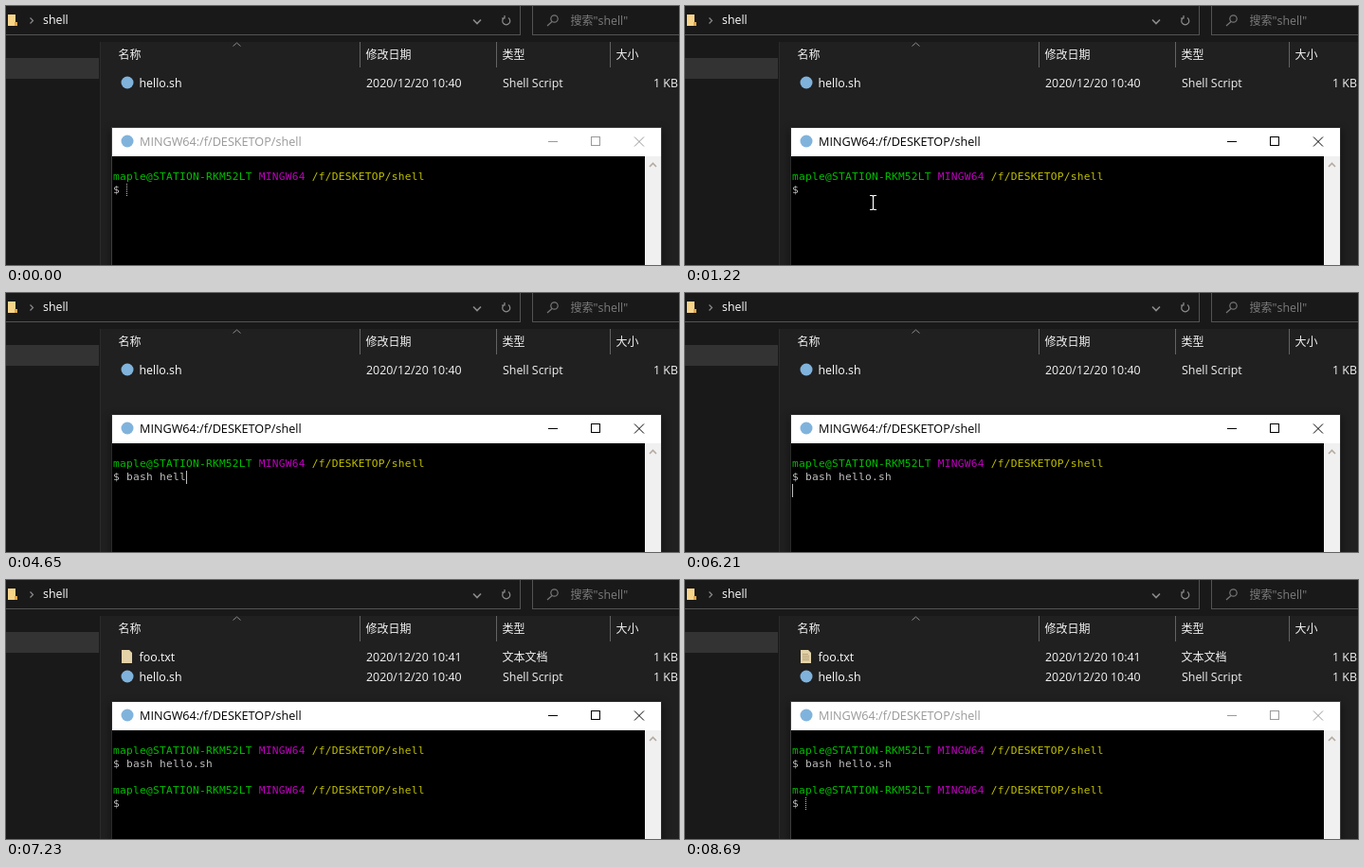
Write an HTML page that moves like this. It is 710 px wide and 274 px high and loops after 8770 ms.

```html
<!DOCTYPE html>
<html lang="zh-CN">
<head>
<meta charset="utf-8">
<title>shell</title>
<style>
html, body { margin: 0; width: 100%; height: 100%; overflow: hidden; background: #202020; }
svg { display: block; width: 710px; height: 274px; }
text { white-space: pre; }
.ui { font: 12.4px "Open Sans", "Noto Sans CJK SC", "Noto Sans CJK", sans-serif; fill: #fff; }
.cjk { font: 12px "Noto Sans CJK SC", "Noto Sans CJK", sans-serif; fill: #f2f2f2; }
.info { fill: #f2f2f2; }
.term { font: 11.2px "DejaVu Sans Mono", monospace; letter-spacing: .257px; fill: #bfbfbf; }
.line { fill: none; stroke: #8c8c8c; stroke-width: 1.2; }
.crisp { shape-rendering: crispEdges; }
#shadow { filter: blur(5px); opacity: .4; }
</style>
</head>
<body>
<svg viewBox="0 0 710 274">
  <rect width="710" height="274" fill="#202020"/>
  <rect width="710" height="38" fill="#191919"/>
  <rect y="38" width="100" height="236" fill="#191919"/>
  <g class="crisp">
    <rect y="55" width="98" height="22" fill="#333"/>
    <rect x="99" y="38" width="1" height="236" fill="#2b2b2b"/>
    <path d="M0 30.5H542.5V0M555.5 0V30.5H710" fill="none" stroke="#535353"/>
    <path d="M373.5 38V65M517.5 38V65M637.5 38V65" stroke="#636363"/>
  </g>

  <path d="M2 9h8v8h2v4H2z" fill="#f7d48a"/>
  <path d="M9 17h3v4H9z" fill="#e0a94e"/>
  <path class="line" d="M25.500 12.500l3 3-3 3"/>
  <text class="ui" x="39" y="19">shell</text>
  <path class="line" d="M493 14.500l4 4 4-4" style="stroke-width:1.600"/>
  <path class="line" d="M530 12.500a4 4 0 1 1-4.500 0M526 10v3h-3"/>
  <g class="line" style="stroke:#777"><circle cx="578.500" cy="13.500" r="3.700"/><path d="M576 16.500L571 21"/></g>
  <text class="ui" x="595.500" y="20" style="fill:#7c7c7c"><tspan font-size="12">搜索</tspan>"shell"</text>

  <path class="line" d="M239.500 42.500l4-3.500 4 3.500" style="stroke-width:1"/>
  <text class="cjk" x="118.500" y="56">名称</text>
  <text class="cjk" x="379.500" y="56">修改日期</text>
  <text class="cjk" x="523.500" y="56">类型</text>
  <text class="cjk" x="643.500" y="56">大小</text>

  <g id="foo">
    <path d="M122 74h8l3 3v11h-11z" fill="#e3d2a8"/>
    <path id="rules" d="M124 78.500h6M124 80.500h7M124 82.500h7M124 84.500h7" stroke="#b5a179" fill="none"/>
    <text class="ui" x="140.500" y="86">foo.txt</text>
    <text class="ui info" x="380" y="86">2020/12/20 10:41</text>
    <text class="cjk" x="523.500" y="86">文本文档</text>
    <text class="ui info" x="683" y="86">1 KB</text>
  </g>
  <g id="hello">
    <circle cx="128" cy="81" r="6.500" fill="#80b3dc"/>
    <text class="ui" x="140.500" y="86">hello.sh</text>
    <text class="ui info" x="380" y="86">2020/12/20 10:40</text>
    <text class="ui info" x="524" y="86">Shell Script</text>
    <text class="ui info" x="683" y="86">1 KB</text>
  </g>

  <rect id="shadow" x="110" y="131" width="583" height="160"/>
  <rect id="frame" x="111" y="128" width="581" height="147"/>
  <rect x="112" y="129" width="579" height="145" fill="#000"/>
  <rect x="112" y="129" width="579" height="30" fill="#fff"/>
  <rect x="674" y="159" width="17" height="115" fill="#f0f0f0"/>
  <path d="M679 170l3.500-3.500 3.500 3.500" fill="none" stroke="#b5aaa0" stroke-width="1.600"/>
  <circle cx="128" cy="143" r="6.500" fill="#80b3dc"/>
  <text class="ui" id="title" x="141" y="148" style="font-size:12.64px">MINGW64:/f/DESKETOP/shell</text>
  <g id="buttons" fill="none">
    <path class="crisp" d="M572 143.500h10M617.500 138.500h9v9h-9z"/>
    <path d="M663 138.500l10 10M673 138.500l-10 10"/>
  </g>

  <g class="term" id="prompt">
    <text x="113" y="184"><tspan fill="#00bf00">maple@STATION-RKM52LT</tspan> <tspan fill="#bf00bf">MINGW64</tspan> <tspan fill="#bfbf00">/f/DESKETOP/shell</tspan></text>
    <text x="113" y="198">$</text>
  </g>
  <use id="prompt2" href="#prompt" y="42"/>
  <text class="term" id="cmd" x="127" y="198"></text>
  <path id="caret" class="crisp" d="M.5 0v14" stroke="#bfbfbf"/>
  <path id="mouse" d="M-3.500-7.500h2.500l1 1 1-1h2.500M0-6.500v13M-3.500 7.500h2.500l1-1 1 1h2.500" fill="none" stroke="#fff" stroke-width="1.200"/>
</svg>
<script>
const LOOP = 8770, CELL = 7, LEFT = 113, TOP = 174, ROW = 14;
const $ = id => document.getElementById(id);
const show = (id, on) => $(id).style.display = on ? '' : 'none';

// time, command typed so far
const typing = [[0, ''], [1770, 'b'], [2550, 'ba'], [2930, 'bas'], [3250, 'bash'],
  [3480, 'bash '], [4180, 'bash h'], [4410, 'bash he'], [4580, 'bash hel'],
  [4650, 'bash hell'], [5130, 'bash hello.sh ']];
// times at which the caret goes off and on again
const blink = [[1220, 1700], [2230, 2550], [4030, 4180], [5660, 6210],
  [6850, 7390], [7920, 8460]];
const moves = [
  { start: 70, end: 760, hide: 1770, from: [392, 266], to: [198, 208] },
  { start: 8000, end: 8150, hide: 8230, from: [472, 229], to: [462, 264] }
];
const STEP = 76.7;

function mouseAt(t) {
  const m = moves.find(m => t >= m.start && t < m.hide);
  if (!m) return null;
  const snapped = Math.floor((t - m.start + 2) / STEP) * STEP;
  const p = Math.min(1, snapped / (m.end - m.start - 4));
  const e = 1 - (1 - p) ** 2;
  return m.from.map((a, i) => Math.round(a + (m.to[i] - a) * e));
}

function draw(t) {
  const active = t >= 690 && t < 8690;
  const ink = active ? '#000' : '#999';
  $('title').style.fill = ink;
  $('buttons').style.stroke = ink;
  $('frame').style.fill = active ? '#2a2a2a' : '#3c3c3c';

  const cmd = typing.filter(s => t >= s[0]).pop()[1];
  $('cmd').textContent = cmd;
  const done = t >= 6380;
  show('prompt2', done);

  const listed = t >= 7230;
  show('foo', listed);
  show('rules', t >= 7310);
  $('hello').setAttribute('transform', `translate(0 ${listed ? 21 : 0})`);

  const [col, row] = done ? [2, 4] : t >= 6210 ? [0, 2] : [2 + cmd.length, 1];
  show('caret', !blink.some(([off, on]) => t >= off && t < on));
  $('caret').setAttribute('transform', `translate(${LEFT + col * CELL} ${TOP + row * ROW})`);
  $('caret').style.strokeDasharray = active ? '' : '1 1';

  const at = mouseAt(t);
  show('mouse', at);
  if (at) $('mouse').setAttribute('transform', `translate(${at[0] + .5} ${at[1]})`);
}

function tick() {
  draw(performance.now() % LOOP);
  requestAnimationFrame(tick);
}
tick();
</script>
</body>
</html>
```
